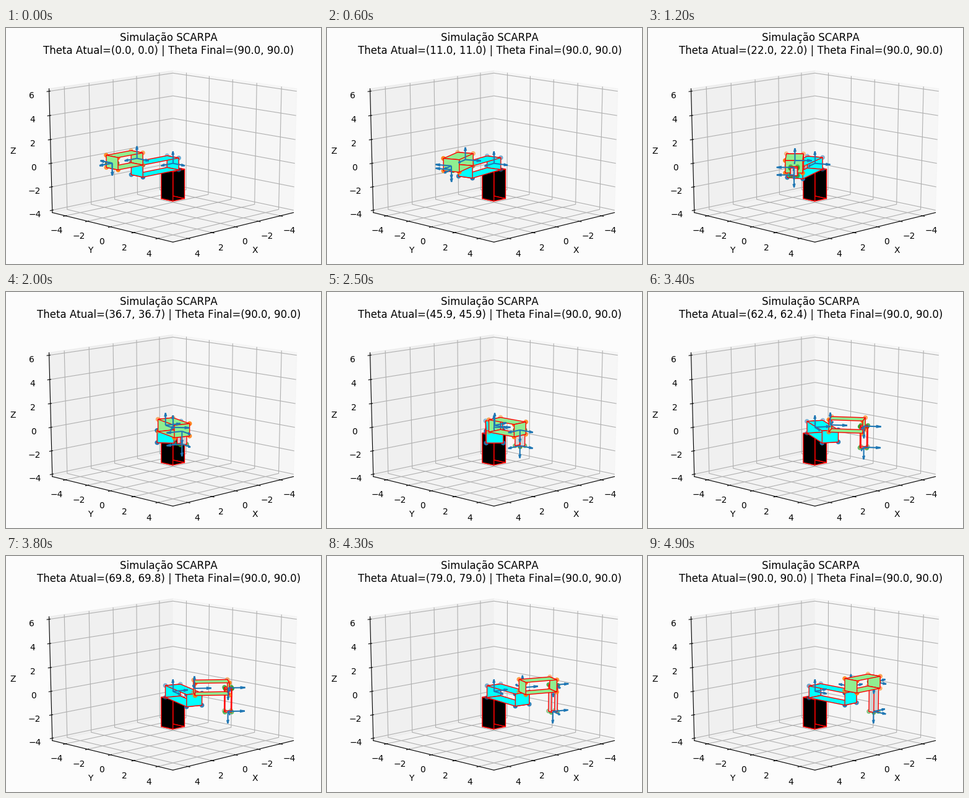
Write a matplotlib script that moves like this. It is 509 px wide and 383 px high and loops after 7900 ms.

```python
import numpy as np
import matplotlib.pyplot as plt
from matplotlib.animation import FuncAnimation
from mpl_toolkits.mplot3d.art3d import Poly3DCollection

W, H, DPI = 509, 383, 100
STEPS, FRAMES, INTERVAL = 50, 79, 100
TARGET = (90.0, 90.0)
L1, L2, DROP = 3.0, 2.0, 2.5
BG = "#fcfcfc"

plt.rcParams.update({"font.family": "DejaVu Sans", "text.kerning_factor": 6})
fig = plt.figure(figsize=(W / DPI, H / DPI), dpi=DPI, facecolor=BG)
ax = fig.add_axes([15 / W, -7.2 / H, 496 / W, 369.6 / H], projection="3d")
ax.apply_aspect = lambda position=None: None  # fill the whole rectangle
ax.set_facecolor(BG)

pad = 10 / 48
ax.set(xlim=(-5 - pad, 5 + pad), ylim=(-5 - pad, 5 + pad), zlim=(-4 - pad, 6 + pad),
       xticks=range(-4, 5, 2), yticks=range(-4, 5, 2), zticks=range(-4, 7, 2),
       xlabel="X", ylabel="Y", zlabel="Z")
ax.set_box_aspect((1, 1, 1), zoom=np.sqrt(3) / 1.8294640721620434)
ax.view_init(elev=15, azim=45)


def rot_z(deg):
    a = np.radians(deg)
    c, s = np.cos(a), np.sin(a)
    return np.array([[c, -s, 0], [s, c, 0], [0, 0, 1]])


def draw_box(rot, origin, xs, ys, zs, color, dots=None):
    """Open box: both x ends plus bottom and top, with optional corner dots."""
    pts = np.array([(x, y, z) for x in xs for y in ys for z in zs])
    pts = pts @ rot.T + origin
    faces = [(0, 1, 3, 2), (4, 5, 7, 6), (0, 2, 6, 4), (1, 3, 7, 5)]
    if dots:
        ax.scatter(*pts.T, color=dots, s=20)
    ax.add_collection3d(Poly3DCollection(
        [pts[list(f)] for f in faces],
        facecolors=color, edgecolors="r", linewidths=1))


def draw_axes(joints):
    """All joint frames in one quiver, so they share one depth."""
    tails = np.repeat([o for _, o in joints], 3, axis=0)
    dirs = np.vstack([rot.T for rot, _ in joints])
    ax.quiver(*tails.T, *dirs.T, color="C0")


def draw(i):
    for c in list(ax.collections):
        c.remove()
    t = min(i, STEPS - 1) / (STEPS - 1)
    th1, th2 = t * TARGET[0], t * TARGET[1]
    d = t * DROP

    r1, r2 = rot_z(th1), rot_z(th1 + th2)
    r3 = r2 @ np.diag([1, -1, -1])
    base = np.zeros(3)
    elbow = r1 @ [L1, 0, 0] + [0, 0, 1]
    wrist = elbow + r2 @ [L2, 0, 0]
    tip = wrist - [0, 0, d]

    half, thin, link = (-0.5, 0.5), (-0.2, 0.2), (-0.45, 0.55)
    draw_box(np.eye(3), base, half, half, (-3, -0.5), "black")
    draw_box(r1, base, (0, L1), half, link, "cyan", "C0")
    draw_box(r2, elbow, (0, L2), half, link, "lightgreen", "C1")
    draw_box(r3, wrist, thin, thin, (0, d), "lightgray", "C2")
    draw_axes([(r1, base), (r2, elbow), (r3, wrist), (r3, tip)])

    ax.set_title("Simulação SCARPA\n"
                 f"Theta Atual=({th1:.1f}, {th2:.1f}) | "
                 f"Theta Final=({TARGET[0]}, {TARGET[1]})", y=1)
    return []


anim = FuncAnimation(fig, draw, frames=FRAMES, interval=INTERVAL,
                     init_func=lambda: [], repeat=True, repeat_delay=0)
plt.show()
```
